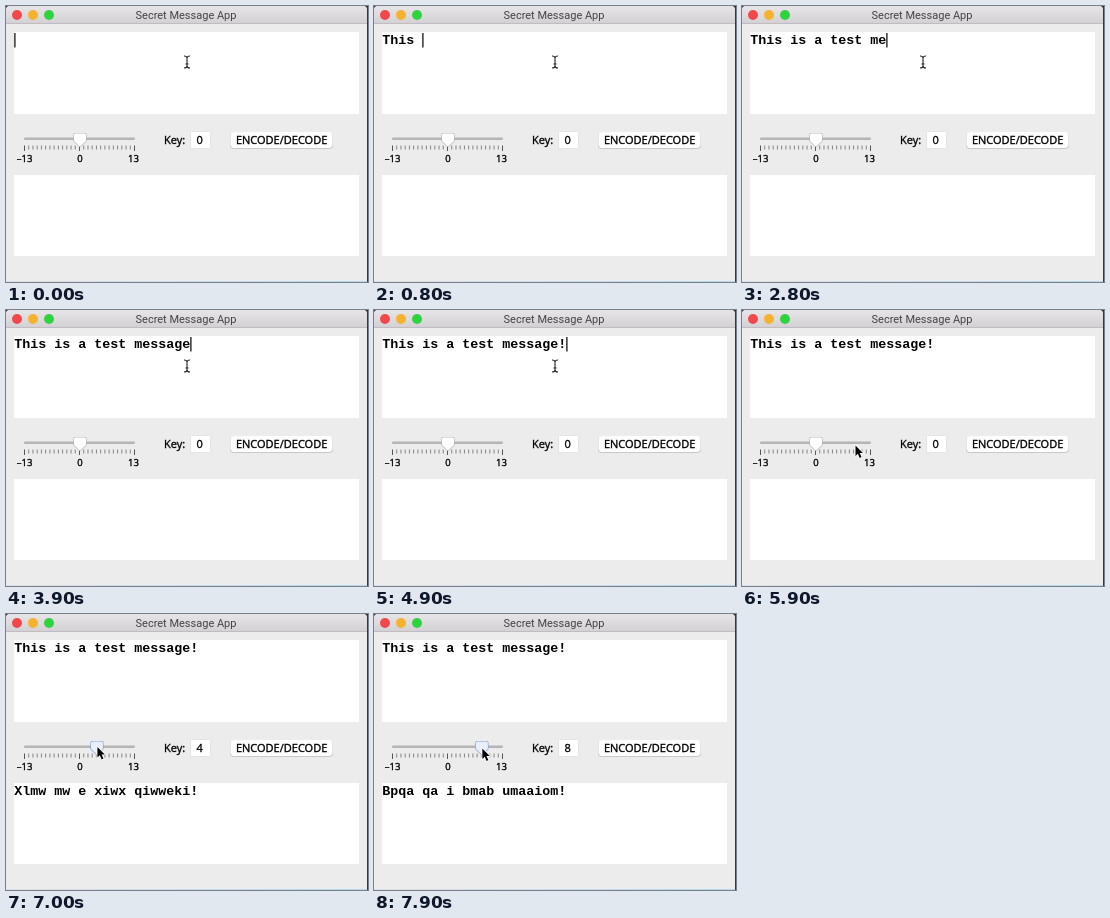
Write an HTML page with a canvas that moves like this. It is 362 px wide and 276 px high and loops after 8000 ms.

```html
<!DOCTYPE html>
<html lang="en">
<head>
<meta charset="utf-8">
<title>Secret Message App</title>
<style>
html, body { margin: 0; width: 362px; height: 276px; overflow: hidden; background: #ececec; }
canvas { display: block; }
</style>
</head>
<body>
<canvas id="stage" width="362" height="276"></canvas>
<script>
const ctx = document.getElementById('stage').getContext('2d');
const LOOP = 8000, STEP = 100, BLINK = 500;
const MONO = 'bold 13.33px "Liberation Mono", monospace';
const UI = '"Open Sans", sans-serif';
const TEXT_X = 8.3, CHAR_W = 8;
const ZERO_X = 74, UNIT = 110 / 26;
const PRESS = 6100, RELEASE = 7900, LAST_KEY = 8;

// Each word is typed from a start time with a fixed gap between keys.
const WORDS = [
  { text: 'This ', start: 300, gap: 100 },
  { text: 'is a ', start: 1400, gap: 25 },
  { text: 'test ', start: 2100, gap: 75 },
  { text: 'message', start: 2650, gap: 145 },
  { text: '!', start: 4900, gap: 100 }
];
const MESSAGE = WORDS.map(w => w.text).join('');

const REST = { x: 181, y: 56 };
const HOVER = { x: 113, y: 135 };
const GRAB = { x: ZERO_X, y: 131 };
const DROP = { x: ZERO_X + LAST_KEY * UNIT, y: 134 };

const lerp = (a, b, p) => a + (b - a) * p;
const progress = (t, from, to) => Math.min(1, Math.max(0, (t - from) / (to - from)));
const smooth = p => p * p * (3 - 2 * p);
const between = (a, b, p) => ({ x: lerp(a.x, b.x, p), y: lerp(a.y, b.y, p) });

function typing(t) {
  let count = 0, last = 0;
  for (const { text, start, gap } of WORDS) {
    if (t < start) break;
    const typed = Math.min(text.length, Math.floor((t - start) / gap) + 1);
    count += typed;
    last = start + (typed - 1) * gap;
  }
  return { count, lit: Math.floor((t - last) / BLINK) % 2 === 0 };
}

function pointerAt(t) {
  if (t < 5900) return between(REST, HOVER, smooth(progress(t, 5100, 5700)));
  if (t < PRESS) return between(HOVER, GRAB, smooth(progress(t, 5900, PRESS)));
  return between(GRAB, DROP, progress(t, PRESS, RELEASE));
}

function shift(text, key) {
  return text.replace(/[a-z]/gi, c => {
    const base = c < 'a' ? 65 : 97;
    return String.fromCharCode((c.charCodeAt(0) - base + key + 26) % 26 + base);
  });
}

function rect(x, y, w, h, color) {
  ctx.fillStyle = color;
  ctx.fillRect(x, y, w, h);
}

function rounded(x, y, w, h, r, color) {
  ctx.fillStyle = color;
  ctx.beginPath();
  ctx.roundRect(x, y, w, h, r);
  ctx.fill();
}

function gradient(x, y, first, last) {
  const g = ctx.createLinearGradient(0, 0, x, y);
  g.addColorStop(0, first);
  g.addColorStop(1, last);
  return g;
}

function label(text, x, y, font, align = 'left', color = '#000') {
  ctx.font = font;
  ctx.textAlign = align;
  ctx.fillStyle = color;
  ctx.fillText(text, x, y);
}

// Interface text, thickened slightly by an outline.
function caption(text, x, y, size, align) {
  label(text, x, y, `500 ${size}px ${UI}`, align);
  ctx.strokeStyle = '#000';
  ctx.lineWidth = 0.35;
  ctx.strokeText(text, x, y);
}

function polygon(points, fill, stroke, width) {
  ctx.beginPath();
  points.forEach(([x, y]) => ctx.lineTo(x, y));
  ctx.closePath();
  ctx.lineJoin = 'round';
  ctx.lineWidth = width;
  ctx.strokeStyle = stroke;
  ctx.stroke();
  ctx.fillStyle = fill;
  ctx.fill();
}

function drawWindow() {
  rect(0, 0, 362, 276, '#34383d');
  rounded(0, 0, 361, 276, [4, 4, 0, 0], '#ececec');
  rounded(0, 0, 361, 17, [4, 4, 0, 0], gradient(0, 17, '#e7e5e7', '#d3d1d3'));
  rect(0, 17, 361, 1, '#bfbdbf');
  rect(0, 275, 361, 1, gradient(361, 0, '#dcdfe1', '#b4d8ea'));
  ['#f0484d', '#f5b22f', '#2fd340'].forEach((color, i) => {
    rounded(6 + i * 16, 4, 10, 10, 5, color);
  });
  label('Secret Message App', 180, 13, '11px Roboto, sans-serif', 'center', '#444');
  rect(8, 26, 345, 82, '#fff');
  rect(8, 169, 345, 81, '#fff');
}

function drawSlider(knob, active) {
  rounded(18, 131.5, 111, 2.5, 1.2, '#b5b5b5');
  for (let i = 0; i <= 26; i++) {
    rect(18 + i * UNIT, 139.5, 1, i % 13 ? 4 : 5.5, i % 13 ? '#858585' : '#555');
  }
  caption('–13', 18.5, 155.6, 9.5, 'center');
  caption('0', 74, 155.6, 9.5, 'center');
  caption('13', 127.5, 155.6, 9.5, 'center');
  const outline = [[-5, 127.5], [5, 127.5], [6, 128.5], [6, 135], [0, 140.5], [-6, 135], [-6, 128.5]];
  polygon(outline.map(([dx, y]) => [knob + dx, y]),
    active ? '#e8eefa' : '#fff', active ? '#7f9fd0' : '#b8b8b8', 1.2);
}

function drawControls(key) {
  caption('Key:', 158, 138, 11);
  rect(184.5, 125.5, 20, 17, '#dedede');
  rect(185, 126, 19, 16, '#fff');
  caption(String(key), 190.5, 138, 11);
  rounded(224, 126.5, 103, 16.5, 4, '#c9c9c9');
  rounded(224.5, 126, 102, 16, 4, '#fff');
  caption('ENCODE/DECODE', 275.6, 138, 11, 'center');
}

function drawIBeam(x, y) {
  ctx.strokeStyle = '#222';
  ctx.lineWidth = 1.1;
  ctx.beginPath();
  for (const side of [-1, 1]) {
    ctx.moveTo(x - 3, y + side * 6);
    ctx.quadraticCurveTo(x, y + side * 6, x, y + side * 4);
    ctx.quadraticCurveTo(x, y + side * 6, x + 3, y + side * 6);
  }
  ctx.moveTo(x, y - 5);
  ctx.lineTo(x, y + 5);
  ctx.moveTo(x - 1.5, y + 2);
  ctx.lineTo(x + 1.5, y + 2);
  ctx.stroke();
}

function drawArrow(x, y) {
  const shape = [[0, 0], [0, 10.5], [2.4, 8.3], [4.2, 12.4], [6, 11.6], [4.2, 7.6], [7.4, 7.4]];
  polygon(shape.map(([dx, dy]) => [x + dx + 0.5, y + dy + 0.5]), '#000', '#fff', 1.6);
}

function draw(t) {
  const { count, lit } = typing(t);
  const pointer = pointerAt(t);
  const overText = pointer.y < 108;
  const dragging = t >= PRESS;
  const knob = dragging ? pointer.x : ZERO_X;
  const key = Math.round((knob - ZERO_X) / UNIT);

  drawWindow();
  label(MESSAGE.slice(0, count), TEXT_X, 38, MONO);
  if (lit && overText) rect(TEXT_X + count * CHAR_W, 27, 1.2, 14.5, '#000');
  if (key) label(shift(MESSAGE, key), TEXT_X, 181, MONO);
  drawSlider(knob, dragging);
  drawControls(key);
  (overText ? drawIBeam : drawArrow)(pointer.x, pointer.y);
}

const start = performance.now();
function tick() {
  const t = (performance.now() - start) % LOOP;
  draw(Math.floor(t / STEP) * STEP);
  requestAnimationFrame(tick);
}
tick();
</script>
</body>
</html>
```
